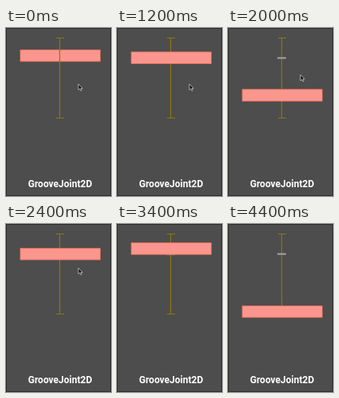
Write an HTML page that moves like this. It is 132x210 px and loops after 5070 ms.

```html
<!DOCTYPE html>
<html lang="en">
<head>
<meta charset="utf-8">
<title>GrooveJoint2D</title>
<style>
  html, body { margin: 0; width: 100%; height: 100%; overflow: hidden; background: #4d4d4d; }
  svg { display: block; width: 100vw; height: 100vh; }
  text { font: bold 12px Roboto, sans-serif; fill: #fff; text-anchor: middle; }
  .groove { fill: none; stroke: #8f7708; stroke-width: 1.2; }
</style>
</head>
<body>
<svg viewBox="0 0 132 210">
  <rect width="132" height="210" fill="#4d4d4d"/>
  <rect x=".5" y=".5" width="131" height="209" fill="none" stroke="#2c2c2c"/>
  <path class="groove" d="M63 12.5h10M67.5 12.5v100M63 112.5h10"/>
  <path d="M62 37.5h11" stroke="#a3a3a3" stroke-width="2"/>
  <rect id="bar" x="18" width="100.5" height="14.5" fill="#fa968e" stroke="#f2745c" stroke-width=".8"/>
  <path id="overlay" class="groove" d="M67.5 27v16"/>
  <text x="68" y="198.5">GrooveJoint2D</text>
  <path id="cursor" d="M0 0v7.4l1.7-1.5 1.3 2.6 1.2-.6-1.2-2.5h2.3z"
        fill="#111" stroke="#ddd" stroke-width=".7"/>
</svg>
<script>
  const LOOP = 5070, FPS = 15, LAST = 66;
  const GRAVITY = 66, TOP = 6.4, BOTTOM = 102.3;
  const [bar, overlay, cursor] = ['bar', 'overlay', 'cursor'].map(id => document.getElementById(id));

  const arc = (t, peak, y) => y + GRAVITY * (t - peak) ** 2;
  const ramp = (t, a, b) => {
    const p = Math.min(1, Math.max(0, (t - a) / (b - a)));
    return p * p * (3 - 2 * p);
  };

  // Two upward kicks, a stop at the upper end, then a free fall.
  function barY(t) {
    const y = t < 2.89
      ? Math.min(arc(t, 0, 27.3), arc(t, 0.74, 16), arc(t, 3.08, -0.2))
      : arc(t, 2.89, TOP);
    return Math.min(BOTTOM, Math.max(TOP, y));
  }

  function cursorPos(t) {
    const out = ramp(t, 2.7, 2.98);
    return [91 + 46 * out, 70 - 15 * ramp(t, 1.33, 2.3) - 65 * out];
  }

  function draw(ms) {
    const step = Math.min(LAST, Math.floor(ms * FPS / 1000 + 0.06));
    const t = step / FPS;
    bar.setAttribute('y', barY(t));
    overlay.style.display = step ? 'none' : '';
    cursor.setAttribute('transform', `translate(${cursorPos(t)})`);
    cursor.style.display = t < 2.99 ? '' : 'none';
  }

  const start = performance.now();
  function tick() {
    draw((performance.now() - start) % LOOP);
    requestAnimationFrame(tick);
  }
  tick();
</script>
</body>
</html>
```
